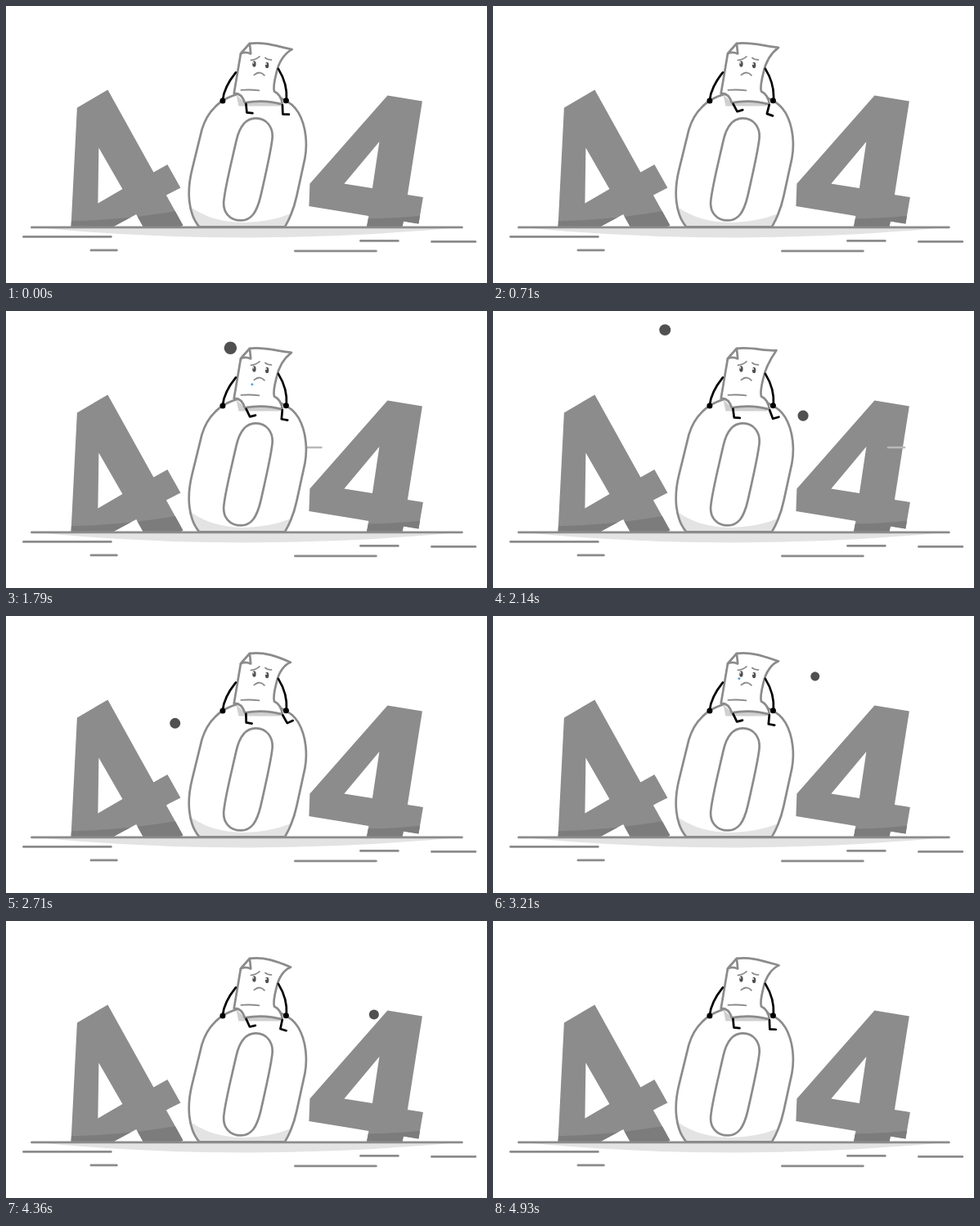
Animation, 588 px wide and 339 px high, one loop 5 s. Source, as an HTML page:

```html
<!DOCTYPE html>
<html lang="en">
<head>
<meta charset="utf-8">
<title>404</title>
<style>
  html, body { margin: 0; width: 100%; height: 100%; overflow: hidden; background: #fff; }
  svg { display: block; width: 588px; height: 339px; }
  .line { fill: none; stroke: #8b8b8b; stroke-width: 2.7; stroke-linecap: round; stroke-linejoin: round; }
  .sheet { fill: #fff; }
  .limb { fill: none; stroke: #000; stroke-width: 2.7; stroke-linecap: round; stroke-linejoin: round; }
  .thin { stroke-width: 1.8; }
  .digit { fill: #8c8c8c; fill-rule: evenodd; }
  .shade { fill: #7c7c7c; }
  .pale { fill: #e3e3e3; }
  .dash { stroke: #b9b9b9; stroke-width: 2.5; stroke-linecap: round; }
</style>
</head>
<body>
<svg viewBox="0 0 588 339">
  <defs>
    <path id="four-a" d="M86.5 124L124 102L180 203L197 193.5L213 222L195.5 231L216 268L212 270H167.5L158.8 254.5L130 270H79L79.5 262ZM113 173L112 241L142 223.5Z"/>
    <path id="four-b" d="M466 109L508.5 116L490.5 230.5L509.5 233.5L504 266L485.5 263L484 270H440.5L443 256.5L370 244.5L371 217ZM456 165.5L413 217L447.5 222.5Z"/>
    <path id="zero" d="M236 270C222 254 220.5 226 227 200L239 151C246 127 266 106 298 106C330 106 349 116 357 130C367 147 368 170 365 186L355 232C352 246 347.5 258 340.5 270Z"/>
    <clipPath id="clip-a"><use href="#four-a" clip-rule="evenodd"/></clipPath>
    <clipPath id="clip-b"><use href="#four-b" clip-rule="evenodd"/></clipPath>
    <clipPath id="clip-z"><use href="#zero"/></clipPath>
  </defs>

  <g transform="translate(.4 .4)">
    <g id="dots" fill="#505050"></g>

    <path class="pale" d="M35 270.5Q294 295.5 553 270.5Z"/>
    <use href="#four-a" class="digit"/>
    <path class="shade" clip-path="url(#clip-a)" d="M70 263Q150 262 220 248V272H70Z"/>
    <use href="#four-b" class="digit"/>
    <path class="shade" clip-path="url(#clip-b)" d="M436 260Q478 260 512 255.500V272H436Z"/>
    <g id="dashes"></g>

    <use href="#zero" class="sheet"/>
    <path class="pale" clip-path="url(#clip-z)" d="M220 242Q250 265 290 264.500Q330 264 360 248V272H220Z"/>
    <use href="#zero" class="line"/>
    <path class="line sheet" d="M305 137C318 137 327 148 325 163C323 180 317 205 311 232C306 253 299 262 287 262C273 262 264 252 266 237C268 219 274 196 281 165C285 147 293 137 305 137Z"/>
    <path class="line" d="M31 270.500H557M21 282H128M103.500 298.500H135M353 299.500H452M433 287H479M520 288H573.500"/>

    <path d="M281 108L284 122H334L337 119Q315 112 292 118Z" fill="#d0d0d0"/>
    <path id="paper" class="line sheet"/>
    <path class="line sheet" d="M286.500 58L297.500 45.500L298.800 58Q292 55 286.500 58Z"/>
    <path class="line thin" d="M287 102.500Q298 101.500 309 103M299 66Q305 65.500 309.500 61.500M316.500 63Q319 65.500 324 65.500"/>
    <path class="line thin" d="M303 84Q310 78 315.500 84.500"/>
    <g fill="#505050">
      <ellipse cx="303" cy="70.500" rx="2.200" ry="3.600"/>
      <ellipse cx="318.700" cy="72" rx="2.200" ry="3.600"/>
    </g>
    <g fill="#fff"><circle cx="301.900" cy="69.200" r="1"/><circle cx="317.600" cy="70.700" r="1"/></g>
    <g id="tears" fill="#5c9fdd"></g>

    <path class="limb" d="M280.500 81Q266 99 264.500 115M332.500 76.500Q344 95 342.500 115"/>
    <circle cx="264.500" cy="115.500" r="3.500"/>
    <circle cx="342" cy="115.300" r="3.500"/>
    <path id="leg-l" class="limb" d="M293 119.500L294 130L301 130.700"/>
    <path id="leg-r" class="limb" d="M337.500 121L338 132L345.500 132.300"/>
  </g>
</svg>
<script>
  const LOOP = 5000;
  const { sin, cos, sqrt, min, max, PI } = Math;
  const $ = id => document.getElementById(id);
  const clamp = v => min(1, max(0, v));

  function set(el, attrs) {
    for (const k in attrs) el.setAttribute(k, attrs[k]);
  }
  function add(parent, tag, item) {
    const el = document.createElementNS("http://www.w3.org/2000/svg", tag);
    return { ...item, el: $(parent).appendChild(el) };
  }

  // Thrown dots: each flies a parabola whose top is (x, y) at time peak.
  const dots = [
    { born: 1225, peak: 1670, x: 236, y: 39, speed: 0.3175, fall: 4e-4, size: 8.5 },
    { born: 1880, peak: 2280, x: 273, y: 10, speed: 0.45, fall: 6.6e-4, size: 7.1 },
    { born: 2440, peak: 3285, x: 419.7, y: 72.5, speed: 0.354, fall: 1.77e-4, size: 6.6 },
    { born: 3800, peak: 4170, x: 378, y: 90, speed: 0.38, fall: 6.6e-4, size: 6.6 }
  ].map(d => add("dots", "circle", d));
  const DRAG = 3.1e-5, DOT_LIFE = 1900, FLOOR = 230;

  function drawDot({ el, born, peak, x, y, speed, fall, size }, t) {
    const s = t - peak, age = t - born;
    const cx = x + speed * s - DRAG * s * s;
    const cy = y + fall * s * s;
    const shrink = clamp(1 - (age / DOT_LIFE) ** 2) * clamp((FLOOR - cy) / 50);
    set(el, { cx, cy, r: size * clamp(age / 180) * shrink });
  }

  // Wind streaks: drift right while growing, then shrinking.
  const dashes = [
    { start: 940, x: 298, y: 29.5 },
    { start: 1510, x: 242, y: 166.5 },
    { start: 3247, x: 242, y: 166.5 }
  ].map(d => add("dashes", "line", d));
  const DASH_LIFE = 700, DRIFT = 278, HALF = 33;

  function drawDash({ el, start, x, y }, t) {
    const u = clamp((t - start) / DASH_LIFE);
    const mid = x + DRIFT * u, half = HALF * sin(PI * u);
    set(el, {
      class: "dash", x1: mid - half, x2: mid + half, y1: y, y2: y,
      visibility: half > 0.5 ? "visible" : "hidden"
    });
  }

  const tears = [783, 3000].map(start => add("tears", "circle", { start }));

  function drawTear({ el, start }, t) {
    const age = max(0, t - start);
    const r = 3.2 * sqrt(age / 950) * clamp((1100 - age) / 200);
    set(el, { cx: 300.5, cy: 75.5 + 1.36e-5 * age * age, r });
  }

  function drawLegs(t) {
    const swing = 1 - cos(4 * PI * t / LOOP);
    const kick = sin(PI * t / LOOP) ** 12;
    set($("leg-l"), { transform: `rotate(${7 * kick - 18.5 * swing} 293 119)` });
    set($("leg-r"), { transform: `rotate(${14 * swing - 32 * kick} 338 120)` });
  }

  // The free corner of the sheet flaps three times per loop.
  function drawPaper(t) {
    const wave = sin(6 * PI * t / LOOP);
    const x = 349.3 - 3.5 * wave * wave, y = 52.7 - 5 * wave;
    set($("paper"), {
      d: `M286.5 58L297.5 45.5C315 43 331 49 ${x} ${y}`
        + `C341 ${57 - 2 * wave} 333 67 330 82`
        + "C327.5 92 326 99 327.5 104C334 107 336.5 112 337.5 120"
        + "Q315 113.5 291.5 118C289 110 284 106 278.3 106.5Z"
    });
  }

  function draw(t) {
    dots.forEach(d => drawDot(d, t));
    dashes.forEach(d => drawDash(d, t));
    tears.forEach(d => drawTear(d, t));
    drawLegs(t);
    drawPaper(t);
  }

  function tick(now) {
    draw(now % LOOP);
    requestAnimationFrame(tick);
  }
  draw(0);
  requestAnimationFrame(tick);
</script>
</body>
</html>
```
